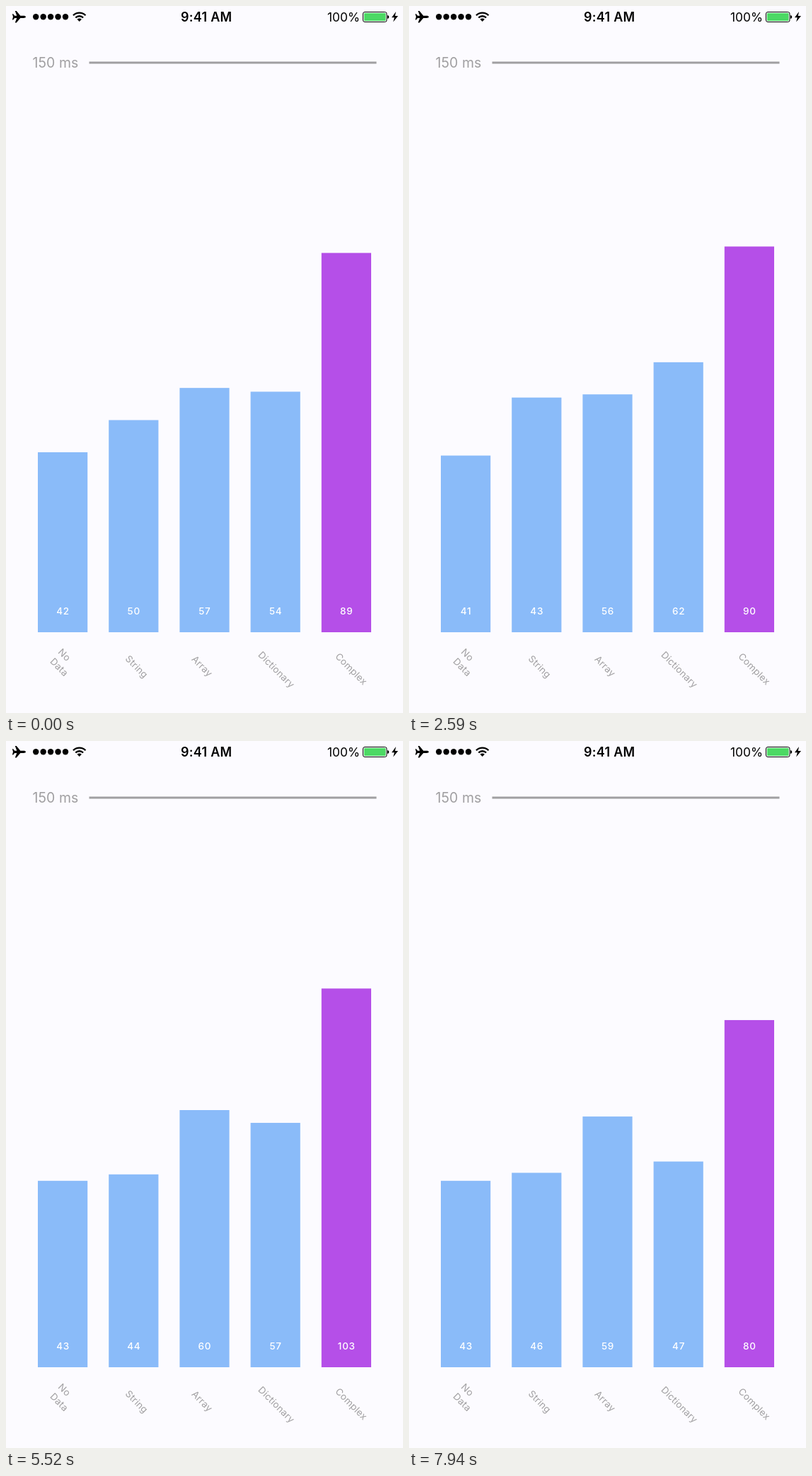
Write an HTML page that moves like this. It is 561 by 998 pixels and loops after 8000 ms.

```html
<!DOCTYPE html>
<html lang="en">
<head>
<meta charset="utf-8">
<title>Benchmark bars</title>
<style>
  html, body { margin: 0; width: 100%; height: 100%; overflow: hidden; background: #fcfbff; }
  svg { display: block; width: 100%; height: 100%; font-family: Inter, Roboto, sans-serif; }
  .gray { fill: #a09fa1; }
  .value { fill: #fff; font-size: 13.5px; font-weight: 500; letter-spacing: .7px; text-anchor: middle; }
  .name { font-size: 13.3px; letter-spacing: .2px; text-anchor: middle; }
</style>
</head>
<body>
<svg viewBox="0 0 561 998">
  <rect width="561" height="998" fill="#fcfbff"/>

  <path d="M28 15.3C28 14.3 26.5 13.7 25 13.7H20.3L14.8 7H12.8L15.3 13.7H12.2L10.2 11.2H8.9L10 15.3L8.9 19.4H10.2L12.2 16.9H15.3L12.8 23.6H14.8L20.3 16.9H25C26.5 16.9 28 16.3 28 15.3Z"/>
  <g id="dots"></g>
  <g fill="none" stroke="#000" stroke-width="2.3">
    <path d="M95 13.2A12.2 12.2 0 0 1 112.4 13.2"/>
    <path d="M98.3 16.5A7.6 7.6 0 0 1 109.1 16.5"/>
  </g>
  <path d="M103.7 22L100.5 18.8A4.5 4.5 0 0 1 106.9 18.8Z"/>
  <text x="283.2" y="21.8" font-size="18" font-weight="600" letter-spacing=".25" text-anchor="middle">9:41 AM</text>
  <text x="500" y="21.8" font-size="17.4" text-anchor="end">100%</text>
  <rect x="504.5" y="8.5" width="33.5" height="14" rx="2.5" fill="#fcfbff" stroke="#000"/>
  <rect x="506" y="10" width="30.5" height="11" rx="1.2" fill="#4cd964"/>
  <path d="M539 13Q541.2 13.4 541.2 15.5T539 18Z"/>
  <path d="M551 8L545 16.2H548.8L547.2 22.5L554 13.9H549.8Z"/>

  <text class="gray" x="37.5" y="87" font-size="19.4" letter-spacing=".1">150 ms</text>
  <path d="M117.5 80H523.5" stroke="#a09fa1" stroke-width="3"/>
  <g id="bars"></g>
  <g id="names" class="gray"></g>
</svg>
<script>
const LOOP = 8000, BASE = 884, UNIT = 9.075, RISE = 750;

// Each test: name lines, their centre, and the milliseconds measured per round
const TESTS = [
  { lines: ["No", "Data"], x: 78.8, y: 924.7, ms: [42, 42, 45, 41, 43, 40, 43] },
  { lines: ["String"], x: 184.5, y: 932.7, ms: [50, 50, 57, 43, 44.9, 44, 46] },
  { lines: ["Array"], x: 277, y: 932, ms: [57, 57, 56, 59, 60, 58, 59] },
  { lines: ["Dictionary"], x: 382, y: 937, ms: [57, 54, 62.6, 60, 57, 47.9] },
  { lines: ["Complex"], x: 487.8, y: 936, ms: [89, 100, 90, 78, 103, 80.9] }
];

// Round starts; the five tests of a round follow at even intervals
const ROUNDS = [-1480, 520, 2050, 3695, 5560, 7090, 9200];

function add(parent, tag, attrs, text = "") {
  const el = document.createElementNS("http://www.w3.org/2000/svg", tag);
  for (const key in attrs) el.setAttribute(key, attrs[key]);
  el.textContent = text;
  return document.getElementById(parent).appendChild(el);
}

for (let i = 0; i < 5; i++) add("dots", "circle", { cx: 42.2 + i * 10.45, cy: 15.2, r: 4.2 });

const bars = TESTS.map(({ lines, x, y }, i) => {
  lines.forEach((line, row) => {
    const side = row - (lines.length - 1) / 2;
    add("names", "text", {
      class: "name", x: side * 7, y: 4.5 + side * 17.5,
      transform: `translate(${x} ${y}) rotate(45)`
    }, line);
  });
  const left = 45 + i * 100.2;
  return {
    rect: add("bars", "rect", { x: left, width: 70.2, fill: i < 4 ? "#8abbf9" : "#b54fe8" }),
    value: add("bars", "text", { class: "value", x: left + 35.5, y: 859 })
  };
});

// cubic-bezier(.42, 0, .58, 1), solved by bisection
function ease(x) {
  if (x >= 1) return 1;
  let lo = 0, hi = 1, s = .5;
  for (let i = 0; i < 20; i++) {
    s = (lo + hi) / 2;
    const at = 1.26 * s * (1 - s) ** 2 + 1.74 * s * s * (1 - s) + s ** 3;
    if (at < x) lo = s; else hi = s;
  }
  return s * s * (3 - 2 * s);
}

// Bars grow in steps of 1.5 ms
const height = ms => Math.round(ms / 1.5) * UNIT;

function render(t) {
  TESTS.forEach(({ ms }, i) => {
    const starts = ROUNDS.slice(0, -1).map((from, r) => from + (ROUNDS[r + 1] - from) * i / 5);
    const done = starts.filter(at => at <= t).length;
    let h = height(ms[done]);
    if (done) {
      const before = height(ms[done - 1]);
      h = before + (h - before) * ease((t - starts[done - 1]) / RISE);
    }
    bars[i].rect.setAttribute("y", BASE - h);
    bars[i].rect.setAttribute("height", h);
    bars[i].value.textContent = Math.floor(ms[done]);
  });
}

const began = performance.now();
function tick() {
  render((performance.now() - began) % LOOP);
  requestAnimationFrame(tick);
}
tick();
</script>
</body>
</html>
```
